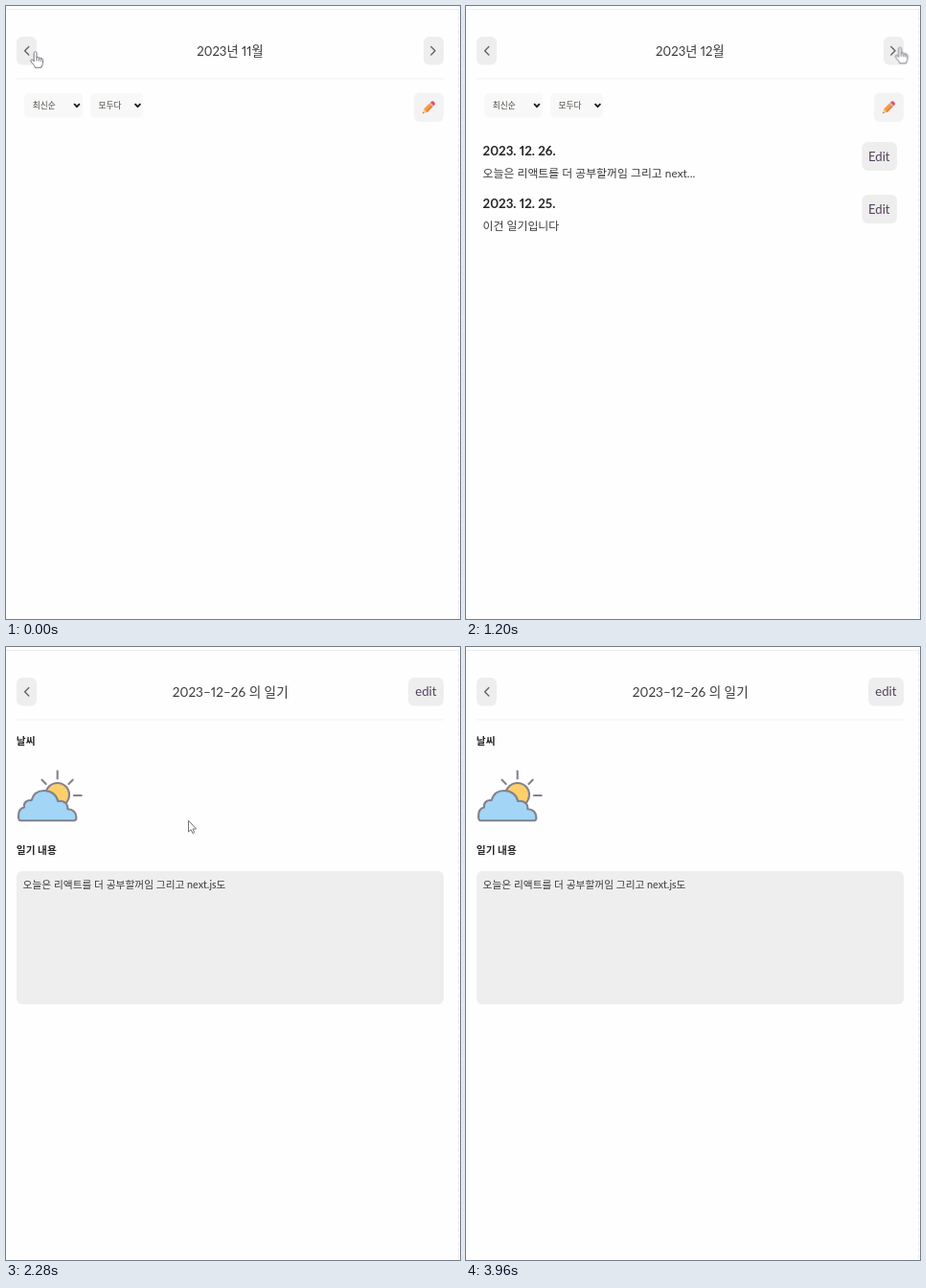
Recreate the animation shown at these times as an HTML page. Size 474x640 px, loop 4080 ms.

```html
<!DOCTYPE html>
<html lang="ko">
<head>
<meta charset="utf-8">
<title>일기장</title>
<style>
  html, body { margin: 0; width: 100%; height: 100%; overflow: hidden; background: #fefefe; }
  svg { display: block; width: 474px; height: 640px; }
  text {
    font-family: Lato, "Noto Sans CJK KR", "Noto Sans CJK", sans-serif;
    font-variant-numeric: proportional-nums;
    fill: #3a3a3a;
  }
  .title { font-size: 13.2px; text-anchor: middle; }
  .wide { font-size: 13.6px; }
  .date { font-size: 13.3px; font-weight: 700; fill: #262626; }
  .row { font-size: 11.9px; }
  .label { font-size: 10.7px; font-weight: 700; fill: #262626; }
  .body { font-size: 10.72px; }
  .option { font-size: 8.7px; fill: #4a4640; }
  .button { font-size: 13.2px; text-anchor: middle; fill: #54425e; }
  .box { fill: #eee; }
  .pale { fill: #f3f3f3; }
  .select { fill: #f8f8f8; }
  .line { fill: none; stroke-linecap: round; stroke-linejoin: round; }
  .chevron { stroke: #666; stroke-width: 1.4; }
  .caret { stroke: #1c1c1c; stroke-width: 1.9; stroke-linecap: butt; stroke-linejoin: miter; }
  .outline { stroke: #83818f; stroke-width: 2.1; stroke-linecap: round; stroke-linejoin: round; }
  .pointer { fill: #fff; stroke: #72727a; stroke-width: 1; stroke-linejoin: round; stroke-linecap: round; }

  /* Hard cuts only: every stage uses step-end over one loop. */
  .list, .november, .december, .detail, .hand, .arrow {
    animation: 4080ms step-end infinite;
  }
  .list { animation-name: list; }
  .november { animation-name: november; }
  .december { animation-name: december; }
  .detail { animation-name: detail; }
  .hand { animation-name: hand; }
  .arrow { animation-name: arrow; }

  @keyframes list { 0% { opacity: 1 } 55.882%, 100% { opacity: 0 } }
  @keyframes november { 0% { opacity: 1 } 29.411%, 100% { opacity: 0 } }
  @keyframes december { 0% { opacity: 0 } 29.411% { opacity: 1 } 55.882%, 100% { opacity: 0 } }
  @keyframes detail { 0% { opacity: 0 } 55.882%, 100% { opacity: 1 } }
  @keyframes hand {
    0% { opacity: 1; transform: translate(25px, 47px) }
    14.705% { opacity: 1; transform: translate(27px, 45px) }
    23.529% { opacity: 0; transform: translate(447.5px, 42.5px) }
    26.47% { opacity: 1; transform: translate(447.5px, 42.5px) }
    47.058%, 100% { opacity: 0; transform: translate(447.5px, 42.5px) }
  }
  @keyframes arrow {
    0% { opacity: 0; transform: translate(250px, 44px) }
    23.529% { opacity: 1; transform: translate(250px, 44px) }
    26.47% { opacity: 0; transform: translate(250px, 44px) }
    47.058% { opacity: 1; transform: translate(412px, 82px) }
    50% { opacity: 1; transform: translate(285px, 150px) }
    52.941% { opacity: 1; transform: translate(199px, 185px) }
    55.882% { opacity: 1; transform: translate(190px, 181px) }
    70.588% { opacity: 1; transform: translate(205.5px, 272.5px) }
    76.47%, 100% { opacity: 0; transform: translate(205.5px, 272.5px) }
  }
</style>
</head>
<body>
<svg viewBox="0 0 474 640">
  <defs>
    <g id="entry-button">
      <rect class="box" x="413.5" y="142" width="36.5" height="30" rx="6"/>
      <text class="button" x="431.3" y="161.5">Edit</text>
    </g>
    <path id="caret" class="line caret" d="M-2.9 -1.5 L0 1.4 L2.9 -1.5"/>
  </defs>

  <rect width="474" height="640" fill="#fefefe"/>
  <path d="M0 3.5 H473" stroke="#ededed"/>
  <path d="M472.5 4 V640" stroke="#ececec" stroke-dasharray="5 2"/>
  <path d="M11 76 H457" stroke="#f1f1f1" stroke-width="1.2"/>
  <rect class="box" x="11" y="32" width="21" height="29.5" rx="6"/>
  <path class="line chevron" d="M23.8 42.6 L19.6 46.8 L23.8 51"/>

  <g class="list">
    <rect class="box" x="436" y="32" width="21" height="29.5" rx="6"/>
    <path class="line chevron" d="M443.8 42.6 L448 46.8 L443.8 51"/>
    <rect class="select" x="19" y="91" width="61" height="25.5" rx="5"/>
    <rect class="select" x="88" y="91" width="55" height="25.5" rx="5"/>
    <text class="option" x="27.7" y="107.2">최신순</text>
    <text class="option" x="96.6" y="107.2">모두다</text>
    <use href="#caret" x="74" y="103.7"/>
    <use href="#caret" x="137.5" y="103.7"/>
    <rect class="pale" x="426" y="90.5" width="31" height="30.5" rx="6"/>
    <g transform="translate(435 112.3) rotate(-45) scale(.95)">
      <path d="M0 0 L4.6 -2.6 V2.6 Z" fill="#f3c79a"/>
      <path d="M0 0 L1.6 -.9 V.9 Z" fill="#777"/>
      <rect x="4.4" y="-2.6" width="8.6" height="5.2" fill="#f79a3c"/>
      <rect x="4.4" y=".8" width="8.6" height="1.8" fill="#ee7b35"/>
      <rect x="13" y="-2.6" width="1.7" height="5.2" fill="#b9c0c8"/>
      <path d="M14.7 -2.6 H16 Q18 -2.6 18 0 Q18 2.6 16 2.6 H14.7 Z" fill="#e8505f"/>
    </g>
  </g>

  <text class="title november" x="233.9" y="51.7">2023년 11월</text>

  <g class="december">
    <text class="title" x="233.9" y="51.7">2023년 12월</text>
    <text class="date" x="17.6" y="156.3">2023. 12. 26.</text>
    <text class="row" x="17.6" y="179">오늘은 리액트를 더 공부할꺼임 그리고 next...</text>
    <use href="#entry-button"/>
    <text class="date" x="17.6" y="211.3">2023. 12. 25.</text>
    <text class="row" x="17.6" y="234">이건 일기입니다</text>
    <use href="#entry-button" y="55"/>
  </g>

  <g class="detail">
    <text class="title wide" x="234.2" y="51.7">2023–12–26 의 일기</text>
    <rect class="box" x="420" y="32" width="37" height="29.5" rx="6"/>
    <text class="button" x="438.4" y="51.3">edit</text>
    <text class="label" x="10.8" y="102.2">날씨</text>
    <g class="outline">
      <path d="M53.7 129.5 V137.5 M71 155 H78.7 M37.5 138.7 L41.7 142.9 M69.7 138.7 L65.5 142.9" fill="none"/>
      <circle cx="53.7" cy="154.3" r="12.3" fill="#ffd06a"/>
      <path fill="#a2d5f6" d="M15.5 181.3 Q13 181.3 13 177 C13 171 15.5 168 19 167.5
        C18 162.5 22 159.3 26.5 160.2 C28.5 153 34 150 39.7 150 C47.5 150 53 154.5 54.2 161
        C60.5 160 65 163.5 64.3 169.2 C70 169 73.4 173 73.4 178 Q73.4 181.3 71 181.3 Z"/>
    </g>
    <text class="label" x="10.8" y="216.2">일기 내용</text>
    <rect class="box" x="11" y="234" width="446" height="139" rx="6"/>
    <text class="body" x="17.6" y="251.8">오늘은 리액트를 더 공부할꺼임 그리고 next.js도</text>
  </g>

  <g class="hand pointer">
    <path d="M4.2 10.5 V2.2 C4.2 .2 7 .2 7 2.2 V7 C7.4 5.8 9.2 6 9.4 7.4 C10 6.4 11.4 6.8 11.6 8
      C12.4 7.3 13.5 8 13.5 9.2 V12.5 C13.5 14.5 12.3 15.2 12 17.3 H5.4
      C5 15.2 2.6 13.2 1 10.8 C.2 9.4 1.8 8.2 2.8 9.2 Z"/>
    <path d="M7 7 V10 M9.4 7.4 V10.2 M11.6 8 V10.4" fill="none"/>
  </g>
  <path class="arrow pointer" d="M.5 .5 V12 L3.1 9.6 L4.9 13.6 L6.7 12.8 L5 9 H8.2 Z"/>
</svg>
</body>
</html>
```
